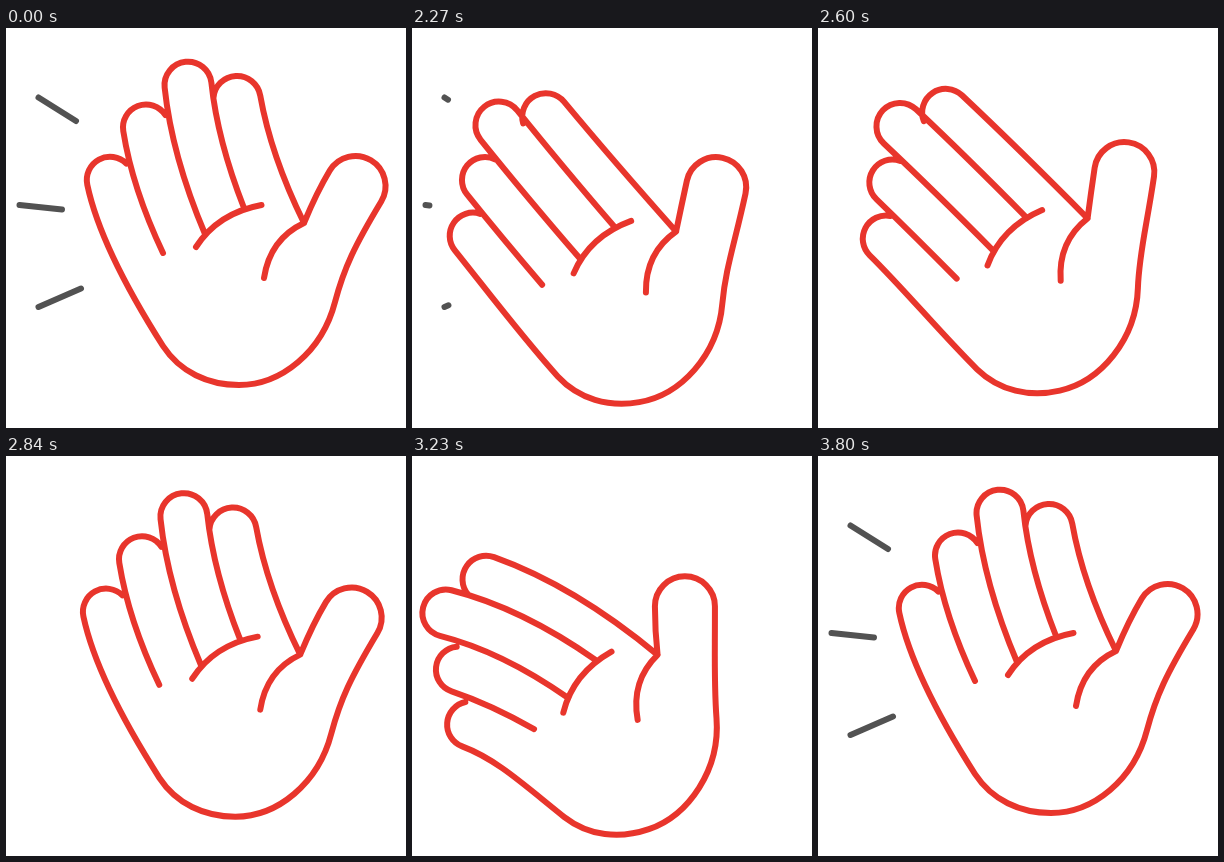
Recreate the animation shown at these times as an HTML page. Size 400 by 400 pixels, loop 3830 ms.

```html
<!DOCTYPE html>
<html lang="en">
<head>
<meta charset="utf-8">
<title>Waving hand</title>
<style>
  html, body { margin: 0; width: 100%; height: 100%; overflow: hidden; background: #fff; }
  svg { display: block; width: 100vw; height: 100vh; }
  path { fill: none; stroke-width: 6; stroke-linecap: round; stroke-linejoin: round; }
</style>
</head>
<body>
<svg viewBox="0 0 400 400">
  <path id="rays" stroke="#525252"/>
  <path id="hand" stroke="#e8352c"/>
</svg>
<script>
const LOOP = 3830, STEP = 30, WAVE_START = 2000;
const PIVOT = [233, 283];

// Times of rest, peak, rest, peak, rest for each part of the wave.
const SHIFT = { peak: 22.3, times: [2000, 2372, 2744, 3116, 3720] };
const TURN = { peak: 19.2, times: [2083, 2455, 2827, 3199, 3725] };
const BEND = { peak: 1.03, times: [2053, 2443, 2850, 3205, 3725] };

// Tip centres and tilts in degrees for bend 0, 0.6 and 1.
const FINGERS = {
  index:  { r: 23.6, tilt: [-10, -30, -50], at: [[231, 71.5], [189, 60], [162, 67]] },
  middle: { r: 23.5, tilt: [-6, -29, -55],  at: [[182, 57], [141.4, 60.2], [113, 84.5]] },
  ring:   { r: 23,   tilt: [-9, -29, -51],  at: [[140, 99.5], [118.3, 112], [106, 142]] },
  pinky:  { r: 23.2, tilt: [-12, -29, -49], at: [[104, 152], [97, 165], [98, 197.6]] },
  thumb:  { r: 30,   tilt: [31, 22, 19],    at: [[349.5, 158], [345, 158], [340, 158]] }
};
const WEB = [298, 195];

// Each ray runs from its outer end to its inner end.
const RAYS = [
  [[32.5, 69.5], [70, 93]],
  [[13.5, 177], [56, 181.5]],
  [[32.5, 279], [75, 260.5]]
];

const clamp = x => Math.min(1, Math.max(0, x));
const smooth = x => x * x * (3 - 2 * x);
const soft = x => 0.7 * smooth(x) + 0.3 * x;
const progress = (t, from, to) => clamp((t - from) / (to - from));
const mix = (a, b, k) => a + (b - a) * k;
const along = (p, d, k) => [p[0] + d[0] * k, p[1] + d[1] * k];
const between = (p, q, k) => [mix(p[0], q[0], k), mix(p[1], q[1], k)];
const distance = (p, q) => Math.hypot(q[0] - p[0], q[1] - p[1]);
const str = p => p[0].toFixed(2) + ' ' + p[1].toFixed(2);

function swing({ peak, times }, t) {
  let sum = 0;
  for (let i = 0; i < 4; i++) {
    sum += (i % 2 ? -1 : 1) * smooth(progress(t, times[i], times[i + 1]));
  }
  return peak * sum;
}

// Parabola through values at 0, 0.6 and 1.
function bendValue([a, b, c], u) {
  const square = ((c - a) * 0.6 - (b - a)) / 0.24;
  return a + (c - a - square) * u + square * u * u;
}

function pose({ r, tilt, at }, u) {
  const centre = [0, 1].map(i => bendValue(at.map(p => p[i]), u));
  const angle = bendValue(tilt, u) * Math.PI / 180;
  // Point on the tip's rim: 0 is the thumb side, 180 the little-finger side.
  const rim = degrees => {
    const a = angle - degrees * Math.PI / 180;
    return along(centre, [Math.cos(a), Math.sin(a)], r);
  };
  return {
    rim,
    down: [-Math.sin(angle), Math.cos(angle)],
    cap: (end, sweep) => `A${r} ${r} 0 0 ${sweep} ${str(end)}`
  };
}

function edge(from, down, base) {
  return `Q${str(along(from, down, 0.45 * distance(from, base)))} ${str(base)}`;
}

function handPath(u) {
  const { index, middle, ring, pinky, thumb } =
    Object.fromEntries(Object.entries(FINGERS).map(([name, f]) => [name, pose(f, u)]));

  const indexEnd = index.rim(0);
  const midRight = middle.rim(0), midLeft = middle.rim(180);
  const ringEnd = ring.rim(180), pinkyEnd = pinky.rim(180);
  const thumbRight = thumb.rim(0), thumbLeft = thumb.rim(180);
  const heel = [157, 318];
  const midBase = [238, 180];
  const rightControl = along(midRight, middle.down, 0.45 * distance(midRight, midBase));
  const wrist = (x, y) => str([x + 4 * u, y]);

  return [
    `M${str(index.rim(mix(166, 150, u)))}`, index.cap(indexEnd, 1),
    edge(indexEnd, index.down, WEB),

    `M${str(midBase)}Q${str(rightControl)} ${str(midRight)}`,
    middle.cap(midLeft, 0), edge(midLeft, middle.down, [199, 206]),

    `M${str(ring.rim(24))}`, ring.cap(ringEnd, 0), edge(ringEnd, ring.down, [157, 225]),

    `M${str(pinky.rim(33))}`, pinky.cap(pinkyEnd, 0),
    `C${str(along(pinkyEnd, pinky.down, 0.3 * distance(pinkyEnd, heel)))} 129 274 ${str(heel)}`,
    `C174 344 202 357 233 357C275 357 ${wrist(316, 324)} ${wrist(329, 274)}`,
    `C${wrist(338, 240)} ${str(along(thumbRight, thumb.down, 52))} ${str(thumbRight)}`,
    thumb.cap(thumbLeft, 0),
    `Q${str(along(thumbLeft, thumb.down, 25))} ${str(WEB)}`,

    'Q264 211 258 250',
    'M190 219Q212 185 255.5 177'
  ].join('');
}

function raysPath(t) {
  const hidden = soft(progress(t, 2000, 2320));
  const shown = soft(progress(t, 3480, 3800));
  const [from, to] = shown > 0 ? [1 - shown, 1] : [0, 1 - hidden];
  if (to - from < 0.002) return '';
  return RAYS.map(([outer, inner]) =>
    `M${str(between(outer, inner, from))}L${str(between(outer, inner, to))}`).join('');
}

const hand = document.getElementById('hand');
const rays = document.getElementById('rays');

function draw(time) {
  const t = time < WAVE_START + STEP ? 0
    : WAVE_START + STEP * Math.floor((time - WAVE_START) / STEP);
  const shift = swing(SHIFT, t);
  hand.setAttribute('d', handPath(swing(BEND, t)));
  hand.setAttribute('transform',
    `translate(${-shift} ${shift}) rotate(${-swing(TURN, t)} ${PIVOT})`);
  rays.setAttribute('d', raysPath(t));
}

const start = performance.now();
function tick() {
  draw((performance.now() - start) % LOOP);
  requestAnimationFrame(tick);
}
tick();
</script>
</body>
</html>
```
